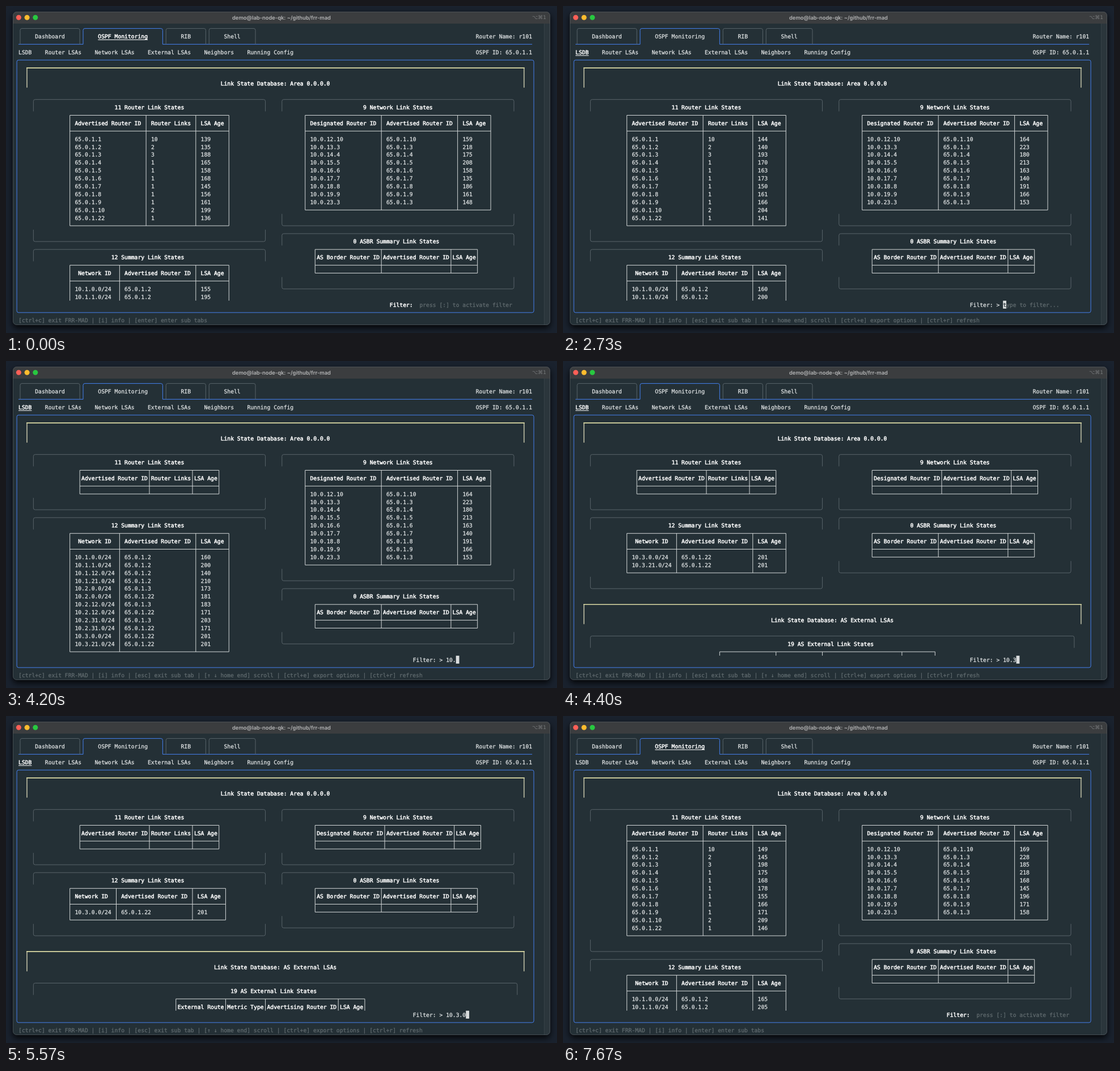
An HTML page that plays this animation: 972x576 px, repeating every 8000 ms.

```html
<!DOCTYPE html>
<html lang="en">
<head>
<meta charset="utf-8">
<title>OSPF monitoring terminal</title>
<style>
  html, body { margin: 0; width: 100%; height: 100%; overflow: hidden; background: #1a222e; }
  svg { display: block; width: 972px; height: 576px; }
  text { white-space: pre; text-rendering: geometricPrecision; }
  #screen { font: 9.71px "DejaVu Sans Mono", monospace; }
  #window { filter: drop-shadow(0 5px 6px #000d); }
</style>
</head>
<body>
<svg viewBox="0 0 972 576">
  <defs>
    <clipPath id="frame"><rect x="12" y="10" width="948" height="552" rx="7"/></clipPath>
    <clipPath id="view"><rect x="20" y="97" width="910" height="422"/></clipPath>
  </defs>
  <g id="window">
    <g clip-path="url(#frame)">
      <rect x="12" y="10" width="948" height="552" fill="#243036"/>
      <rect x="949" y="31" width="11" height="531" fill="#2b363c"/>
      <path d="M949.5 31V562" stroke="#364146"/>
      <rect x="12" y="10" width="948" height="21" fill="#3b3d3f"/>
    </g>
    <rect x="12.5" y="10.5" width="947" height="551" rx="6.5" fill="none" stroke="#596064" stroke-opacity=".6"/>
  </g>
  <circle cx="22.4" cy="20.3" r="4.5" fill="#fe5f57"/>
  <circle cx="37.1" cy="20.3" r="4.5" fill="#febc2e"/>
  <circle cx="51.8" cy="20.3" r="4.5" fill="#28c840"/>
  <text x="486" y="23.5" text-anchor="middle" fill="#b4b5b6" font-family="Inter, sans-serif" font-weight="600" font-size="9.4">demo@lab-node-qk: ~/github/frr-mad</text>
  <text x="953" y="23.4" text-anchor="end" fill="#77797b" font-family="DejaVu Sans, sans-serif" font-size="9">⌥⌘1</text>
  <g id="screen"></g>
</svg>
<script>
const LOOP = 8000, CELL_W = 5.846, CELL_H = 13.9;
const TEXT = '#e3e6e7', WHITE = '#fff', DIM = '#626c70', GREY = '#59646a', BLUE = '#4580f0', YELLOW = '#dcdba4';

// The terminal grid: left edge and centre of a column, middle of a row
const left = c => 16.2 + c * CELL_W;
const centre = c => left(c + .5);
const mid = r => 39.6 + r * CELL_H;

const stroke = (d, color, width = 1) => `<path d="${d}" fill="none" stroke="${color}" stroke-width="${width}"/>`;
const text = (c, r, s, color = TEXT, weight = .25) =>
  `<text x="${left(c).toFixed(2)}" y="${(mid(r) + 3.4).toFixed(2)}" fill="${color}" stroke="${color}" stroke-width="${weight}">${s}</text>`;
const bold = (c, r, s) => text(c, r, s, WHITE, .5);
const active = (c, r, s) => bold(c, r, s) +
  stroke(`M${left(c)} ${mid(r) + 6}h${s.length * CELL_W}`, WHITE);
const centred = (c, width, s) => c + Math.floor((width - s.length) / 2);

// A rounded border on row r whose sides reach half a row past row `end`
function arch(c0, c1, r, end, color) {
  const [x0, x1, y] = [centre(c0), centre(c1), mid(r)], dir = Math.sign(end - r);
  const tip = mid(end) + dir * CELL_H / 2, bend = y + dir * 3;
  return stroke(`M${x0} ${tip}V${bend}Q${x0} ${y} ${x0 + 3} ${y}H${x1 - 3}Q${x1} ${y} ${x1} ${bend}V${tip}`, color);
}

const zip = (...cols) => cols[0].map((_, i) => cols.map(col => col[i]));
const router = n => '65.0.1.' + n;
const ids = s => s.split(' ').map(router);
const ages = s => s.split(' ').map(Number);

const ROUTERS = {
  title: '11 Router Link States', head: ['Advertised Router ID', 'Router Links', 'LSA Age'],
  rows: zip(ids('1 2 3 4 5 6 7 8 9 10 22'), '10 2 3 1 1 1 1 1 1 2 1'.split(' '),
    ages('139 135 188 165 158 168 145 156 161 199 136'))
};
const NETWORKS = {
  title: '9 Network Link States', head: ['Designated Router ID', 'Advertised Router ID', 'LSA Age'],
  rows: zip('12.10 13.3 14.4 15.5 16.6 17.7 18.8 19.9 23.3'.split(' ').map(n => '10.0.' + n),
    ids('10 3 4 5 6 7 8 9 3'), ages('159 218 175 208 158 135 186 161 148'))
};
const SUMMARY = {
  title: '12 Summary Link States', head: ['Network ID', 'Advertised Router ID', 'LSA Age'],
  rows: zip('1.0 1.1 1.12 1.21 2.0 2.0 2.12 2.12 2.31 2.31 3.0 3.21'.split(' ').map(n => `10.${n}.0/24`),
    ids('2 2 2 2 3 22 3 22 3 22 22 22'), ages('155 195 135 205 168 176 178 166 198 166 196 196'))
};
const ASBR = {
  title: '0 ASBR Summary Link States', head: ['AS Border Router ID', 'Advertised Router ID', 'LSA Age'], rows: []
};
const EXTERNAL = {
  title: '19 AS External Link States', head: ['External Route', 'Metric Type', 'Advertising Router ID', 'LSA Age'],
  rows: [['10.3.21.0/24', 'E2', router(22), 196]]
};

// Draws a bordered table; returns its markup and the row of its bottom border
function table(c, width, r, head, rows) {
  const pad = rows.length ? 1 : 0;
  const widths = head.map((h, i) => Math.max(h.length, ...rows.map(row => row[i].length)) + 2 * pad);
  const total = widths.reduce((a, b) => a + b + 1, 1);
  const start = c + Math.floor((width - total) / 2), bottom = r + 3 + rows.length;
  const [x0, x1, y0, y1] = [centre(start), centre(start + total - 1), mid(r), mid(bottom)];
  let d = `M${x0} ${y0}H${x1}V${y1}H${x0}ZM${x0} ${mid(r + 2)}H${x1}`;
  let out = '', col = start;
  widths.forEach((w, i) => {
    out += bold(centred(col + 1, w, head[i]), r + 1, head[i]);
    rows.forEach((row, j) => out += text(col + 1 + pad, r + 3 + j, row[i]));
    if (i) d += `M${centre(col)} ${y0}V${y1}`;
    col += w + 1;
  });
  return [stroke(d, '#d3d7d8') + out, bottom];
}

// Draws a titled box around a table; returns its markup and the row of its bottom border
function box(c0, c1, r, data, state, inset = 0) {
  const width = c1 - c0 - 1;
  const rows = data.rows.map(row => row.map((v, i) => String(i === row.length - 1 ? v + state.age : v)))
    .filter(row => row.some(v => v.includes(state.filter || '')));
  const [body, bottom] = table(c0 + 1, width - inset, r + 2, data.head, rows);
  return [arch(c0, c1, r, r + 1, GREY) + bold(centred(c0 + 1, width, data.title), r + 1, data.title) +
    body + arch(c0, c1, bottom + 2, bottom + 1, GREY), bottom + 2];
}

function section(r, title) {
  const [x0, x1, y] = [centre(3) + .3, centre(153) + .3, mid(r)], end = mid(r + 2.5);
  return stroke(`M${x0} ${y}V${end}M${x1} ${y}V${end}`, '#adae98', 1.8) +
    stroke(`M${x0 - 1} ${y}H${x1 + 1}`, YELLOW, 1.6) + bold(centred(4, 149, title), r + 2, title);
}

function header(inSub) {
  const tabs = [['Dashboard', 1], ['OSPF Monitoring', 20], ['RIB', 45], ['Shell', 58]];
  let out = stroke(`M${left(1)} ${mid(2)}H${centre(20)}M${centre(44)} ${mid(2)}H${left(156)}`, BLUE);
  tabs.forEach(([name, c], i) => {
    out += arch(c, c + name.length + 9, 0, 1.5, i === 1 ? BLUE : GREY);
    out += (i === 1 && !inSub ? active : text)(c + 5, 1, name);
  });
  out += (inSub ? active : text)(1, 3, 'LSDB');
  [['Router LSAs', 9], ['Network LSAs', 24], ['External LSAs', 40], ['Neighbors', 57], ['Running Config', 70]]
    .forEach(([name, c]) => out += text(c, 3, name));
  return out + text(139, 1, 'Router Name: r101') + text(139, 3, 'OSPF ID: 65.0.1.1');
}

function filterLine(filter) {
  if (filter === null) return bold(113, 35, 'Filter:') + text(122, 35, 'press [:] to activate filter', DIM);
  const at = 130 + filter.length;
  const cursor = `<rect x="${left(at)}" y="${mid(34.5)}" width="${CELL_W}" height="${CELL_H}" fill="#d9dcdd"/>`;
  return text(120, 35, 'Filter: > ' + filter) + cursor +
    (filter ? '' : text(130, 35, 't', '#243036') + text(131, 35, 'ype to filter...', DIM));
}

function draw(state) {
  const [routers, r1] = box(5, 75, 9, ROUTERS, state);
  const [summary, r2] = box(5, 75, r1 + 1, SUMMARY, state);
  const [networks, r3] = box(80, 150, 9, NETWORKS, state);
  const [asbr, r4] = box(80, 150, r3 + 1, ASBR, state);
  const next = Math.max(r2, r4) + 2;
  const [external] = box(5, 151, next + 4, EXTERNAL, state, 2);
  const footer = '[ctrl+c] exit FRR-MAD | [i] info | ' + (state.inSub
    ? '[esc] exit sub tab | [↑ ↓ home end] scroll | [ctrl+e] export options | [ctrl+r] refresh'
    : '[enter] enter sub tabs');
  return header(state.inSub) +
    `<rect x="${centre(0)}" y="${mid(4)}" width="${156 * CELL_W}" height="${32 * CELL_H}"
      rx="3" fill="none" stroke="${BLUE}"/>` +
    `<g clip-path="url(#view)">${section(5, 'Link State Database: Area 0.0.0.0')}${routers}${summary}${networks}${asbr}` +
    `${section(next, 'Link State Database: AS External LSAs')}${external}</g>` +
    filterLine(state.filter) + text(1, 37, footer, DIM);
}

// What is typed in the filter from each moment on; null means it is closed
const TYPING = [[0, null], [2500, ''], [3530, '1'], [3570, '10'], [4200, '10.'], [4400, '10.3'],
  [4600, '10.3.'], [4830, '10.3.0'], [6470, null]];

const stateAt = t => ({
  inSub: t >= 1500 && t < 7670,
  age: t >= 7670 ? 10 : t >= 2500 ? 5 : 0,
  filter: TYPING.filter(([from]) => t >= from).pop()[1]
});

const screen = document.getElementById('screen');
const begin = performance.now();
let shown;
function tick() {
  const state = stateAt((performance.now() - begin) % LOOP), key = JSON.stringify(state);
  if (key !== shown) {
    shown = key;
    screen.innerHTML = draw(state);
  }
  requestAnimationFrame(tick);
}
tick();
</script>
</body>
</html>
```
